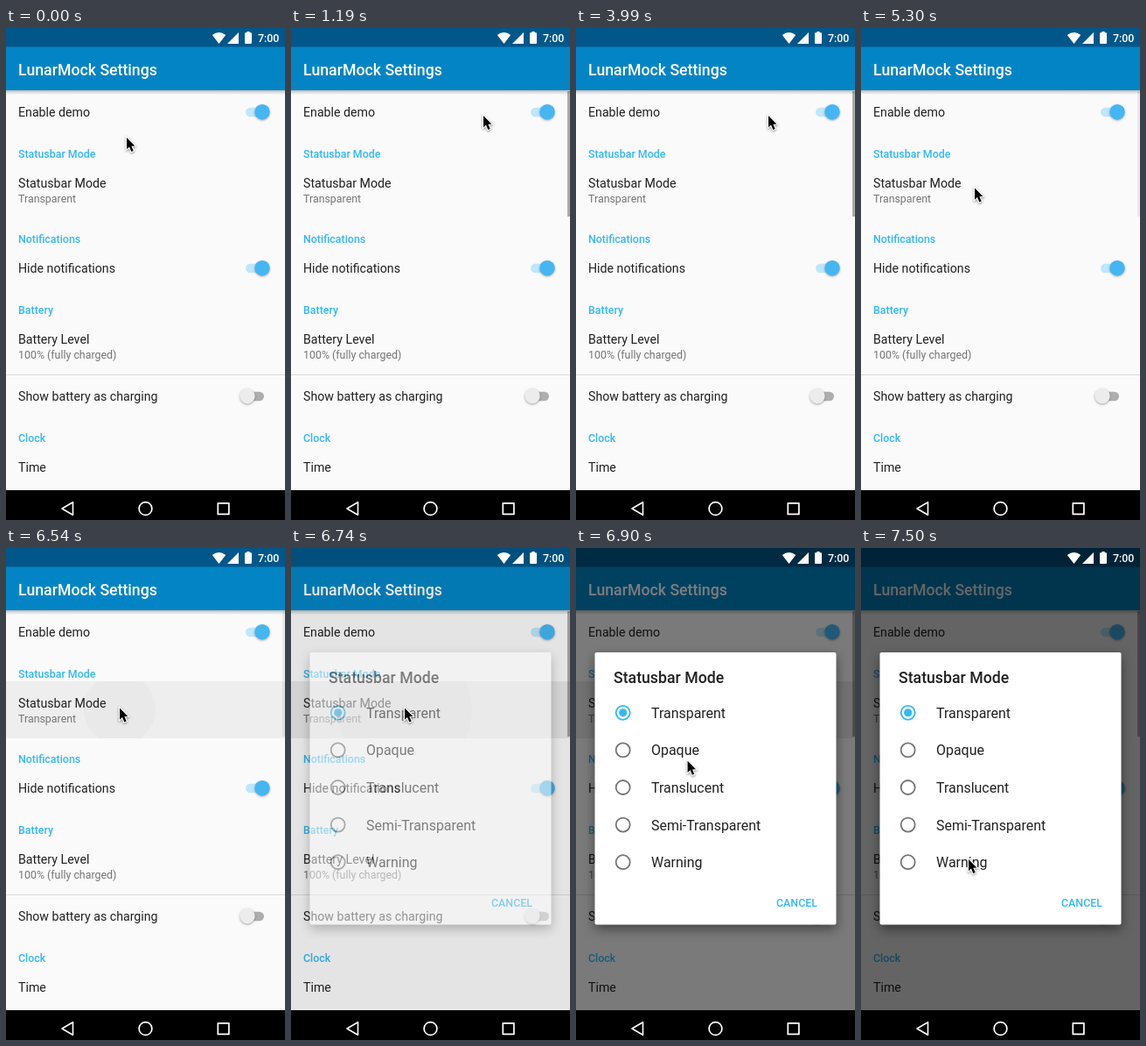
An HTML page with a canvas for the animation above (8 s loop, 319x561 px).

```html
<!DOCTYPE html>
<html lang="en">
<head>
<meta charset="utf-8">
<title>Settings demo</title>
<style>
html, body { margin: 0; width: 100%; height: 100%; overflow: hidden; background: #000; }
canvas { display: block; width: 319px; height: 561px; }
</style>
</head>
<body>
<canvas id="stage"></canvas>
<script>
const W = 319, H = 561, LOOP = 8000;
const ACCENT = '#33b8f6', INK = '#212121', GREY = '#757575';
const FONT = 'Roboto, "Noto Sans", sans-serif';
const dpr = window.devicePixelRatio || 1;

function makeContext(canvas) {
  canvas.width = Math.round(W * dpr);
  canvas.height = Math.round(H * dpr);
  const c = canvas.getContext('2d');
  c.scale(dpr, dpr);
  return c;
}

const ctx = makeContext(document.getElementById('stage'));
const dialogLayer = document.createElement('canvas');
const dialogCtx = makeContext(dialogLayer);

const clamp = x => Math.max(0, Math.min(1, x));
const span = (t, a, b) => clamp((t - a) / (b - a));
const mix = (a, b, u) => a + (b - a) * u;
const smooth = u => u * u * (3 - 2 * u);
const easeOut = u => 1 - (1 - u) * (1 - u);
const black = a => `rgba(0,0,0,${a})`;

function text(c, str, x, y, size, color, weight = 400) {
  c.font = `${weight} ${size}px ${FONT}`;
  c.fillStyle = color;
  c.fillText(str, x, y);
}

function disc(c, x, y, r, color) {
  c.fillStyle = color;
  c.beginPath();
  c.arc(x, y, r, 0, 2 * Math.PI);
  c.fill();
}

function ring(c, x, y, r, width, color) {
  c.strokeStyle = color;
  c.lineWidth = width;
  c.beginPath();
  c.arc(x, y, r, 0, 2 * Math.PI);
  c.stroke();
}

function box(c, x, y, w, h, r, color) {
  c.fillStyle = color;
  c.beginPath();
  c.roundRect(x, y, w, h, r);
  c.fill();
}

function trace(c, points, closed = true) {
  c.beginPath();
  points.forEach(([x, y]) => c.lineTo(x, y));
  if (closed) c.closePath();
}

function fillShape(c, points, color) {
  trace(c, points);
  c.fillStyle = color;
  c.fill();
}

function withShadow(c, color, blur, dy, draw) {
  c.save();
  c.shadowColor = color;
  c.shadowBlur = blur * dpr;
  c.shadowOffsetY = dy * dpr;
  draw();
  c.restore();
}

function drawSwitch(y, on) {
  box(ctx, 274, y - 5.3, 21, 10.6, 5.3, black(0.3 * (1 - on)));
  ctx.globalAlpha = on;
  box(ctx, 274, y - 5.3, 21, 10.6, 5.3, '#bfe6fb');
  ctx.globalAlpha = 1;
  const rgb = [[236, 69], [236, 182], [236, 242]].map(([a, b]) => Math.round(mix(a, b, on)));
  withShadow(ctx, black(0.35), 2.5, 1, () =>
    disc(ctx, mix(276, 293, on), y - 0.3, 8.7, `rgb(${rgb})`));
}

// Row press: a flat tint plus a ripple growing from the pointer.
function drawRowPress(t) {
  const shown = span(t, 6460, 6580) * (1 - span(t, 6840, 7080));
  if (!shown) return;
  ctx.save();
  ctx.beginPath();
  ctx.rect(0, 152, W, 65);
  ctx.clip();
  ctx.fillStyle = black(0.07 * shown);
  ctx.fillRect(0, 152, W, 65);
  disc(ctx, 130, 184, 77 * Math.sqrt(span(t, 6460, 6740)) + 260 * span(t, 6740, 7000), black(0.03 * shown));
  ctx.restore();
}

function drawSwitchPress(t, start, length, on) {
  const u = span(t, start - 40, start + length);
  if (u <= 0 || u >= 1) return;
  const a = 0.14 * Math.min(1, u * 5) * (1 - span(u, 0.5, 1));
  disc(ctx, mix(276, 293, on), 96, 21 * easeOut(clamp(u * 2)),
    on > 0.5 ? `rgba(51,184,246,${a * 1.6})` : black(a));
}

function drawPage(t) {
  ctx.fillStyle = '#fafafa';
  ctx.fillRect(0, 0, W, 527);
  drawRowPress(t);

  const heads = [['Statusbar Mode', 147.6], ['Notifications', 245.2], ['Battery', 326], ['Clock', 472]];
  const rows = [['Enable demo', 101], ['Statusbar Mode', 182], ['Hide notifications', 279.2],
    ['Battery Level', 360], ['Show battery as charging', 425.2], ['Time', 506]];
  const notes = [['Transparent', 199.2], ['100% (fully charged)', 377.2]];
  heads.forEach(([s, y]) => text(ctx, s, 14, y, 12.4, ACCENT, 500));
  rows.forEach(([s, y]) => text(ctx, s, 14, y, 14.2, INK));
  notes.forEach(([s, y]) => text(ctx, s, 14, y, 12.4, GREY));
  ctx.fillStyle = '#dcdcdc';
  ctx.fillRect(0, 395, W, 1);

  const on = 1 - smooth(span(t, 1390, 1640)) + smooth(span(t, 3390, 3640));
  drawSwitchPress(t, 1390, 440, on);
  drawSwitchPress(t, 3350, 640, on);
  drawSwitch(96, on);
  drawSwitch(274, 1);
  drawSwitch(420, 0);

  let bar = 0;
  if (t >= 1190) bar = mix(1, 0.22, span(t, 4940, 5300));
  if (t >= 6700) bar = 1;
  ctx.fillStyle = black(0.32 * bar);
  ctx.fillRect(316, 72, 3, 143);

  const shade = ctx.createLinearGradient(0, 71, 0, 76);
  shade.addColorStop(0, black(0.24));
  shade.addColorStop(1, black(0));
  ctx.fillStyle = shade;
  ctx.fillRect(0, 71, W, 5);
  ctx.fillStyle = '#0385c5';
  ctx.fillRect(0, 21, W, 50);
  ctx.fillStyle = '#02578a';
  ctx.fillRect(0, 0, W, 21.5);
  text(ctx, 'LunarMock Settings', 14, 53.6, 17.7, '#fff', 500);
}

function drawWifi(x) {
  ctx.fillStyle = '#fff';
  ctx.beginPath();
  ctx.moveTo(x, 18);
  ctx.lineTo(x - 7.7, 8);
  ctx.quadraticCurveTo(x, 2, x + 7.7, 8);
  ctx.closePath();
  ctx.fill();
}

function drawMissedCall() {
  ctx.strokeStyle = '#fff';
  ctx.lineWidth = 1.4;
  trace(ctx, [[11, 10], [11, 6.5], [14.2, 6.5]], false);
  ctx.stroke();
  trace(ctx, [[11, 6.5], [15.2, 10.5], [20, 6]], false);
  ctx.stroke();
  ctx.lineWidth = 3;
  ctx.beginPath();
  ctx.moveTo(9, 16);
  ctx.quadraticCurveTo(15, 10.8, 21, 16);
  ctx.stroke();
}

function drawMessage() {
  box(ctx, 31.5, 5, 12, 10, 1, '#fff');
  fillShape(ctx, [[31.5, 13], [31.5, 18], [35, 15]], '#fff');
  ctx.fillStyle = '#02578a';
  [[34, 7.2, 7], [34, 9.5, 7], [34, 11.8, 5]].forEach(([x, y, w]) => ctx.fillRect(x, y, w, 1));
}

function drawStatus(demo) {
  const signal = [[266, 5], [266, 18], [253, 18]];
  if (demo) {
    drawWifi(243.5);
    fillShape(ctx, signal, '#fff');
  } else {
    drawMissedCall();
    drawMessage();
    drawWifi(237.5);
    for (const [width, color] of [[3.6, '#02578a'], [1.4, '#fff']]) {
      ctx.strokeStyle = color;
      ctx.lineWidth = width;
      ctx.beginPath();
      ctx.moveTo(240.5, 13); ctx.lineTo(245, 17.5);
      ctx.moveTo(245, 13); ctx.lineTo(240.5, 17.5);
      ctx.stroke();
    }
    fillShape(ctx, signal, 'rgba(255,255,255,.35)');
    fillShape(ctx, [[261, 10], [261, 18], [253, 18]], '#fff');
    text(ctx, '4G', 249.5, 10.2, 7, '#fff', 700);
  }
  box(ctx, 273, 5.2, 8, 12.8, 1, '#fff');
  ctx.fillRect(275.4, 4, 3.2, 2);
  text(ctx, demo ? '7:00' : '9:42', 288, 16, 12.4, '#fff', 500);
}

function drawNav() {
  ctx.fillStyle = '#000';
  ctx.fillRect(0, 527, W, 34);
  ctx.strokeStyle = '#fff';
  ctx.lineWidth = 1.6;
  ctx.lineJoin = 'round';
  trace(ctx, [[64, 548], [76.5, 540.7], [76.5, 555.3]]);
  ctx.stroke();
  ring(ctx, 159.5, 548, 7.4, 1.7, '#fff');
  ctx.strokeRect(242.3, 541.8, 12.6, 12.6);
}

function paintDialog() {
  const c = dialogCtx;
  c.clearRect(0, 0, W, H);
  withShadow(c, black(0.45), 13, 5, () => box(c, 21.5, 119, 276, 310.5, 2, '#fff'));
  text(c, 'Statusbar Mode', 43, 154, 17.7, INK, 500);
  ['Transparent', 'Opaque', 'Translucent', 'Semi-Transparent', 'Warning'].forEach((label, i) => {
    const y = 187.8 + i * 42.6;
    ring(c, 53.7, y, 8, 1.8, i ? GREY : ACCENT);
    if (!i) disc(c, 53.7, y, 4.6, ACCENT);
    text(c, label, 86, y + 6, 15.95, INK);
  });
  text(c, 'CANCEL', 229, 409.4, 12.4, ACCENT, 500);
}

function drawDialog(t) {
  const alpha = easeOut(span(t, 6690, 6850));
  if (!alpha) return;
  paintDialog();
  ctx.globalAlpha = alpha;
  ctx.drawImage(dialogLayer, 0, 0, W, H);
  ctx.globalAlpha = 1;
}

// Pointer moves: start, end, target x, target y, easing.
const moves = [
  [20, 360, 220, 100, smooth],
  [4920, 5300, 130, 182.5, smooth],
  [6760, 7100, 123.5, 346, smooth],
  [7280, 7500, 123, 355, smooth]
];

function pointerAt(t) {
  let x = 138, y = 125;
  for (const [a, b, tx, ty, ease] of moves) {
    const u = ease(span(t, a, b));
    x = mix(x, tx, u);
    y = mix(y, ty, u);
  }
  return [x, y];
}

function drawPointer(t) {
  const [x, y] = pointerAt(t);
  ctx.save();
  ctx.translate(x, y);
  trace(ctx, [[0, 0], [0, 13.2], [3, 10.5], [5.3, 16], [7.7, 15], [5.4, 9.7], [9.4, 9.4]]);
  ctx.lineJoin = 'miter';
  ctx.miterLimit = 3;
  ctx.lineWidth = 2.2;
  ctx.strokeStyle = '#fff';
  withShadow(ctx, black(0.45), 2.5, 1, () => ctx.stroke());
  ctx.fillStyle = '#000';
  ctx.fill();
  ctx.restore();
}

function draw(t) {
  drawPage(t);
  ctx.fillStyle = black(0.6 * span(t, 6705, 6935));
  ctx.fillRect(0, 0, W, 527);
  drawDialog(t);
  drawStatus(t < 1590 || t >= 3590);
  drawNav();
  drawPointer(t);
}

let start;
function tick(now) {
  start ??= now;
  draw((now - start) % LOOP);
  requestAnimationFrame(tick);
}
requestAnimationFrame(tick);
</script>
</body>
</html>
```
